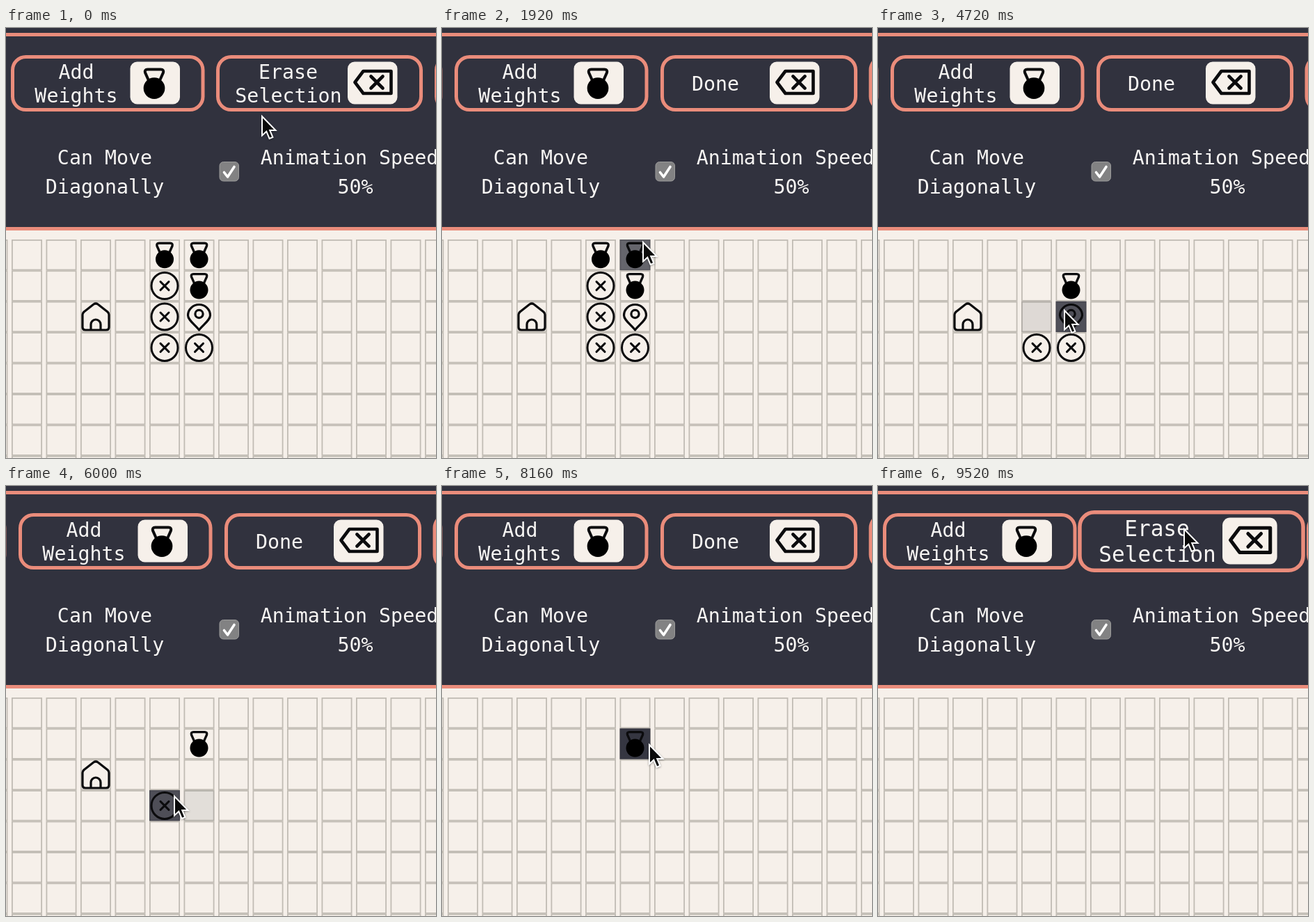
Write an HTML page that moves like this. It is 618x618 px and loops after 9600 ms.

```html
<!DOCTYPE html>
<html lang="en">
<head>
<meta charset="utf-8">
<title>Path grid editor</title>
<style>
  html, body { margin: 0; width: 100%; height: 100%; overflow: hidden; background: #f6f0ea; }
  svg { display: block; width: 100vw; height: 100vh; }
  text { font: 28.3px "DejaVu Sans Mono", "Liberation Mono", monospace; fill: #f8f6f4; text-anchor: middle; }
  .line { fill: none; stroke: #0b0b0d; stroke-linecap: round; stroke-linejoin: round; }
  .cell { fill: #f6f0ea; stroke: #c1bcb4; stroke-width: 1.8; }
  .frame { fill: #31323e; stroke: #ea8c7b; stroke-width: 5; }
</style>
</head>
<body>
<svg id="stage" viewBox="0 0 618 618"></svg>
<script>
const LOOP = 9600, STEP = 80, FADE = 100;
const GRID = { x: 8, y: 304, dx: 49.5, dy: 44.4, w: 44 };
const DONE_AT = 640, RESET_AT = 9360;

// kind, column, row, time of removal
const ITEMS = [
  ["bell", 4, 0, 3040], ["bell", 5, 0, 2240], ["bell", 5, 1, 8400],
  ["cross", 4, 1, 3600], ["cross", 4, 2, 4080], ["cross", 4, 3, 6240], ["cross", 5, 3, 5600],
  ["home", 2, 2, 7440], ["pin", 5, 2, 5040]
];

// time, x, y of the pointer tip
const PATH = [
  [0, 368, 127], [80, 368, 127], [480, 440, 62], [1120, 440, 62],
  [1840, 291, 307], [1920, 289, 308], [2160, 285, 314], [2480, 285, 314],
  [3040, 240, 335], [3280, 240, 335], [3520, 232, 372], [3760, 232, 372],
  [4080, 226, 402], [4340, 226, 402], [4660, 267, 405], [4720, 268, 406],
  [5120, 268, 406], [5440, 271, 452], [5610, 271, 452], [5930, 242, 446],
  [6480, 242, 446], [7120, 154, 425], [7360, 134, 420], [7440, 134, 420],
  [7920, 288, 374], [8160, 298, 372], [8480, 298, 372], [9200, 440, 62], [LOOP, 440, 62]
];

const ICONS = {
  bell: `<path class="line" stroke-width="3.4" d="M-7 -4 L-11 -13 Q-12 -17 -8 -17 H8 Q12 -17 11 -13 L7 -4"/>
    <circle cy="6" r="13"/>`,
  cross: `<g class="line" stroke-width="3"><circle r="19"/><path d="M-6 -6 L6 6 M6 -6 L-6 6"/></g>`,
  home: `<path class="line" stroke-width="3.2" d="M-19 -3 Q-19 -5 -17 -7 L-3 -18 Q0 -20 3 -18 L17 -7 Q19 -5 19 -3
    V15 Q19 19 15 19 H-15 Q-19 19 -19 15 Z M-7 19 V11 A7 7 0 0 1 7 11 V19"/>`,
  pin: `<g class="line" stroke-width="3.2"><path d="M0 19 C-5 12 -16 5 -16 -2 A16 15.5 0 0 1 16 -2 C16 5 5 12 0 19 Z"/>
    <circle cy="-4" r="5.6"/></g>`,
  erase: `<g class="line" stroke-width="4.6"><path d="M-26 0 L-14 -16 H26 V16 H-14 Z"/>
    <path d="M-3 -8.5 L14 8.5 M14 -8.5 L-3 8.5"/></g>`
};

const icon = (name, x, y, scale = 1) =>
  `<g transform="translate(${x} ${y}) scale(${scale})">${ICONS[name]}</g>`;
const text = (s, x, y) => `<text x="${x}" y="${y}">${s}</text>`;
const frame = (x0, x1) =>
  `<rect class="frame" x="${x0 + 2.5}" y="41.5" width="${x1 - x0 - 5}" height="76" rx="19"/>`;
const tile = (x, inner) =>
  `<rect x="${x}" y="48.5" width="71.5" height="61" rx="10" fill="#f6f0ea"/>${inner}`;
const cellX = c => GRID.x + c * GRID.dx;
const cellY = r => GRID.y + r * GRID.dy;

function addButton(x) {
  return frame(x, x + 278.5) + text("Add", x + 94, 73) + text("Weights", x + 94, 106.5) +
    tile(x + 171.5, icon("bell", x + 206, 79.5, 1.18));
}

function gridMarkup() {
  let out = "";
  for (let r = 0; r < 8; r++) {
    for (let c = -1; c < 13; c++) {
      const box = `x="${cellX(c)}" y="${cellY(r)}" width="${GRID.w}" height="${GRID.dy}"`;
      out += `<rect class="cell" x="${cellX(c) + .9}" y="${cellY(r) + .9}" width="${GRID.w - 1.8}" height="${GRID.dy - 1.8}"/>
        <rect ${box} fill="#31323e" opacity="0" id="shade${c}_${r}"/>`;
    }
  }
  ITEMS.forEach(([kind, c, r], i) => {
    out += `<g id="item${i}">${icon(kind, cellX(c) + 22, cellY(r) + 22.2)}</g>`;
  });
  return out;
}

document.getElementById("stage").innerHTML = `
  <rect width="618" height="618" fill="#f6f0ea"/>
  <rect width="618" height="290" fill="#31323e"/>
  <rect y="7" width="618" height="5" fill="#ea8c7b"/>
  <rect y="286" width="618" height="5" fill="#ea8c7b"/>
  ${text("Can Move", 142, 195.5)}${text("Diagonally", 142, 238)}
  <rect x="307" y="192.5" width="27.5" height="27.5" rx="5.5" fill="#828283" stroke="#9b9b9b"/>
  <path d="M313.5 207.5 L318.5 214 L328 199.5" fill="none" stroke="#fff" stroke-width="3.6"
    stroke-linecap="round" stroke-linejoin="round"/>
  ${text("Animation Speed:", 502, 195.5)}${text("50%", 502, 238)}
  ${gridMarkup()}
  <g id="idle">
    ${addButton(7)}${frame(616, 900)}
    <g id="idleMain">${frame(302, 599)}${text("Erase", 405.5, 73)}${text("Selection", 406, 106.5)}
      ${tile(491, icon("erase", 527.5, 78))}</g>
  </g>
  <g id="busy">
    ${frame(-280, .4)}${addButton(18)}${frame(613.5, 900)}
    <g id="busyMain">${frame(314, 597)}${text("Done", 393, 90)}
      ${tile(471, icon("erase", 507.5, 78))}</g>
  </g>
  <path id="pointer" d="M0 0 V27.5 L6.3 21.7 L10.6 32 L15.4 30 L11.2 20 H19.5 Z" fill="#0a0a0a"
    stroke="#fff" stroke-width="2" style="filter: drop-shadow(0 1px 1.5px rgba(0,0,0,.35))"/>`;

const el = id => document.getElementById(id);
const show = (id, on) => { el(id).style.display = on ? "" : "none"; };
const shades = [...document.querySelectorAll("[id^=shade]")];

function pointerAt(t) {
  const i = Math.max(1, PATH.findIndex(p => p[0] >= t));
  const [t0, x0, y0] = PATH[i - 1], [t1, x1, y1] = PATH[i];
  const u = Math.min(1, Math.max(0, (t - t0) / (t1 - t0)));
  const k = u * u * (3 - 2 * u);
  return [x0 + (x1 - x0) * k, y0 + (y1 - y0) * k];
}

function targetAt([x, y]) {
  if (y > 39 && y < 120 && x > 302 && x < 598) return "button";
  const c = Math.floor((x - GRID.x) / GRID.dx), r = Math.floor((y - GRID.y) / GRID.dy);
  return r >= 0 && x - cellX(c) <= GRID.w ? `shade${c}_${r}` : "";
}

// Recent hover history, weighted by an exponential decay.
function hoverLevels(t) {
  const levels = {}, dt = 10, k = 1 - Math.exp(-dt / FADE);
  for (let age = 0; age < 1000; age += dt) {
    const id = targetAt(pointerAt(Math.max(0, t - age)));
    levels[id] = (levels[id] || 0) + k * Math.exp(-age / FADE);
  }
  return levels;
}

function grow(id, cx, level) {
  const cy = 79.5, s = 1 + .1 * level;
  el(id).setAttribute("transform", `translate(${cx} ${cy}) scale(${s}) translate(${-cx} ${-cy})`);
}

function draw(t) {
  const [x, y] = pointerAt(t), levels = hoverLevels(t);
  const busy = t >= DONE_AT && t < RESET_AT;
  el("pointer").setAttribute("transform", `translate(${x} ${y})`);
  show("idle", !busy);
  show("busy", busy);
  grow("idleMain", 450.5, levels.button || 0);
  grow("busyMain", 455.5, levels.button || 0);
  shades.forEach(s => s.setAttribute("opacity", levels[s.id] || 0));
  ITEMS.forEach((item, i) => show("item" + i, t < item[3]));
}

const start = performance.now();
function tick() {
  const t = (performance.now() - start) % LOOP;
  draw(Math.floor(t / STEP) * STEP);
  requestAnimationFrame(tick);
}
tick();
</script>
</body>
</html>
```
